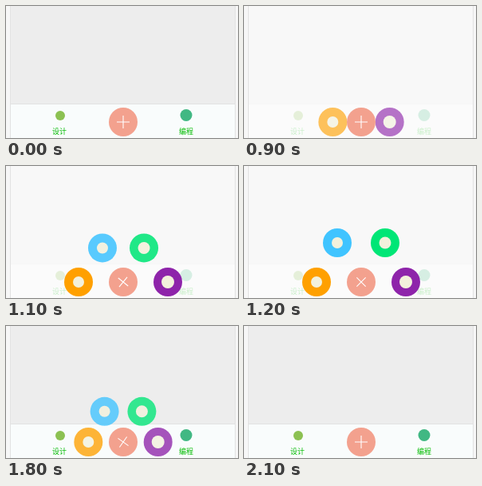
An HTML page that plays this animation: 291x165 px, repeating every 2.5 s.

```html
<!DOCTYPE html>
<html lang="zh">
<head>
<meta charset="utf-8">
<style>
  html, body { margin: 0; height: 100%; overflow: hidden; background: #f7f7f7; }
  svg { display: block; width: 100%; height: 100%; }
  text { font: 9px "Noto Sans CJK SC", "Noto Sans CJK", sans-serif; fill: #0b0; text-anchor: middle; }
</style>
</head>
<body>
<svg viewBox="0 0 291 165">
  <rect width="291" height="165" fill="#f7f7f7"/>
  <rect x="5" width="283" height="165" fill="#e2e2e2"/>
  <rect x="6" width="281" height="122" fill="#ededed"/>
  <rect x="6" y="123" width="281" height="42" fill="#f9fcfc"/>
  <circle cx="68" cy="137" r="6" fill="#8cc152"/>
  <circle cx="226" cy="136.500" r="7.500" fill="#41b883"/>
  <text x="67" y="160">设计</text>
  <text x="226" y="160">编程</text>
  <rect id="veil" x="6" width="281" height="165" fill="#fcfcfc" opacity=".8"/>
  <g id="items"></g>
  <g transform="translate(147 145)">
    <circle r="18" fill="#f3a18e"/>
    <path id="plus" d="M-8 0H8M0-8V8" stroke="#fff" stroke-width="1.100"/>
  </g>
</svg>
<script>
const LOOP = 2500, STEP = 100, CENTER = [147, 145];
const OPEN = 800, CLOSE = 1700;

const clamp = v => Math.min(1, Math.max(0, v));
const easeOut = (u, power) => 1 - (1 - clamp(u)) ** power;
const smooth = u => { u = clamp(u); return u * u * (3 - 2 * u); };

const sideOpen = t => easeOut((t - OPEN) / 300, 2.5);
const topOpen = t => easeOut((t - OPEN - 160) / 220, 2);

const items = [
  { dx: -30, dy: -49, color: '#40c4ff', mark: 7, open: topOpen },
  { dx: 30, dy: -49, color: '#00e676', mark: 7.5, open: topOpen },
  { dx: -56, dy: 0, color: '#ffa000', mark: 7, open: sideOpen },
  { dx: 56, dy: 0, color: '#8e24aa', mark: 8, open: sideOpen },
];

const veil = document.getElementById('veil');
const plus = document.getElementById('plus');
const group = document.getElementById('items');
group.innerHTML = items.map(({ color, mark }) =>
  `<g><circle r="18" fill="${color}"/><circle r="${mark}" fill="#f3f1dc"/></g>`).join('');

function draw(now) {
  const t = Math.floor(now % LOOP / STEP) * STEP;
  const stay = 1 - smooth((t - CLOSE) / 330);
  items.forEach(({ dx, dy, open }, i) => {
    const p = open(t) * stay, node = group.children[i];
    node.setAttribute('transform', `translate(${CENTER[0] + dx * p} ${CENTER[1] + dy * p})`);
    node.setAttribute('opacity', p);
  });
  plus.setAttribute('transform', `rotate(${45 * topOpen(t) * stay})`);
  veil.style.display = t >= OPEN && t < CLOSE ? '' : 'none';
}

const start = performance.now();
(function frame() {
  draw(performance.now() - start);
  requestAnimationFrame(frame);
})();
</script>
</body>
</html>
```
